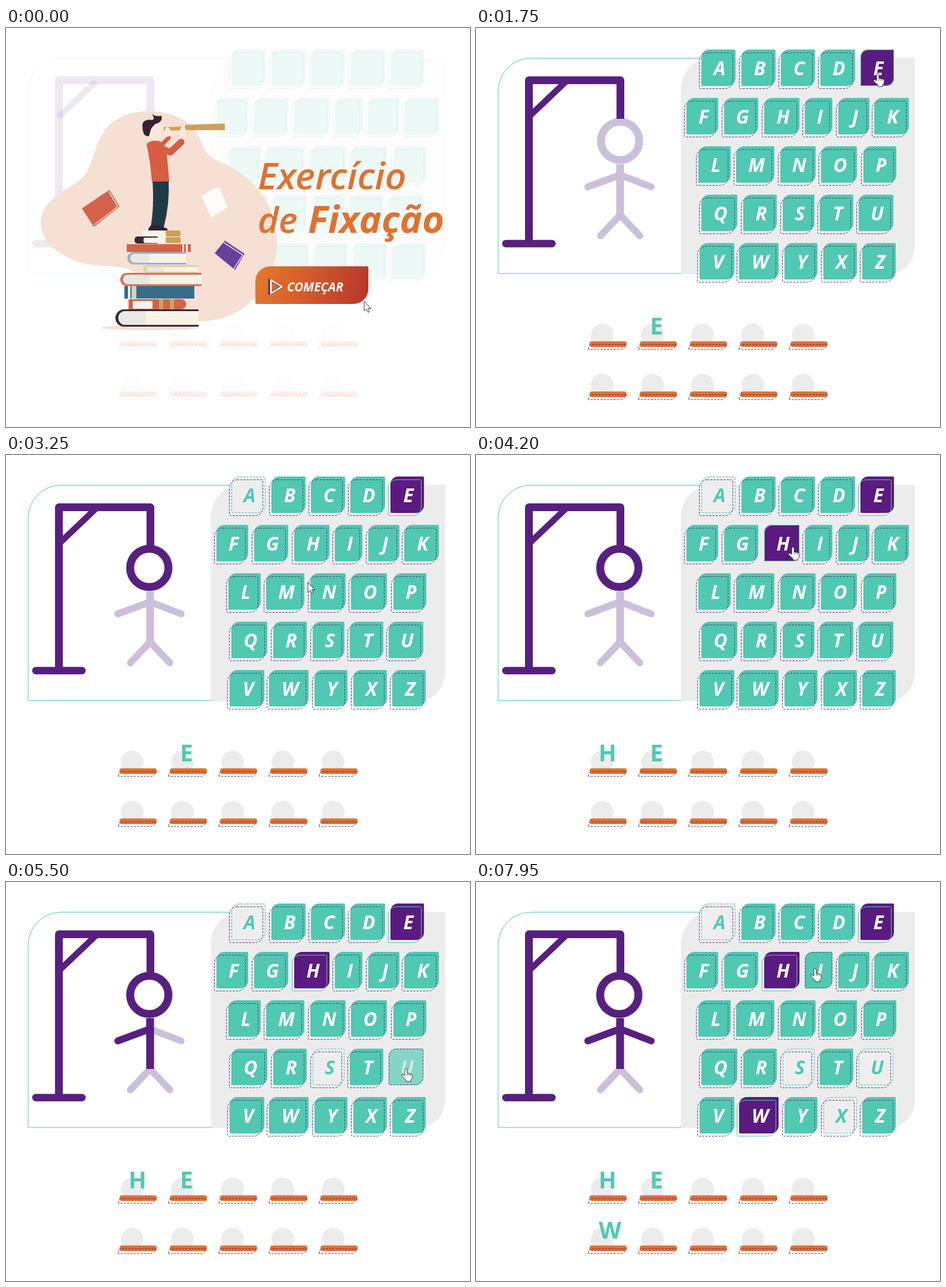
An HTML page with a canvas that plays this animation: 776 by 668 pixels, repeating every 8000 ms.

```html
<!DOCTYPE html>
<html lang="pt">
<head>
<meta charset="utf-8">
<title>Exercício de Fixação</title>
<style>
html, body { margin: 0; width: 100%; height: 100%; overflow: hidden; background: #fff; }
canvas { display: block; }
</style>
</head>
<body>
<canvas id="stage" width="776" height="668"></canvas>
<script>
const ctx = document.getElementById('stage').getContext('2d');
const LOOP = 8000, STEP = 50, FADE = 150;
const TEAL = '#51c8b1', PURPLE = '#57207f', ORANGE = '#e1712f', FAINT = '#cbbfd9', PEACH = '#f5e0d3';
const RED = '#d4624a', GOLD = '#cba258', CREAM = '#f7f3e6';
const FONT = '"Open Sans", "Noto Sans", sans-serif';

// Each row: letters, then left and right edge of every key
const rows = [
  ['ABCDE', [377, 434, 444, 501, 510, 567, 576, 634, 643, 699]],
  ['FGHIJK', [352, 405, 415, 472, 482, 541, 550, 596, 606, 658, 666, 724]],
  ['LMNOP', [372, 426, 435, 499, 509, 568, 577, 637, 648, 703]],
  ['QRSTU', [377, 437, 447, 503, 513, 566, 575, 631, 640, 698]],
  ['VWYXZ', [374, 432, 440, 506, 516, 571, 581, 637, 646, 702]]
];
const keys = rows.flatMap(([letters, edges], r) => [...letters].map((ch, i) =>
  ({ ch, x: edges[2 * i], w: edges[2 * i + 1] - edges[2 * i], y: 36 + 81 * r, h: 61 })));

// Click times; a hit fills a slot [column, row], a miss draws a limb
const hits = { E: [1600, 1, 0], H: [3650, 0, 0], W: [7200, 0, 1] };
const misses = { A: 2550, S: 4600, U: 5450, X: 6200 };

// Pointer moves: start, end, x, y
const moves = [
  [950, 1600, 672, 77], [2050, 2450, 406, 75], [3000, 3250, 505, 214],
  [3250, 3600, 530, 155], [4200, 4550, 541, 315], [5000, 5400, 669, 313],
  [5850, 6200, 613, 388], [6850, 7150, 475, 392], [7550, 7950, 567, 146]
];

const clamp = v => Math.max(0, Math.min(1, v));
const ease = v => v * v * (3 - 2 * v);
const asPath = p => p instanceof Path2D ? p : new Path2D(p);

function fill(path, color) {
  ctx.fillStyle = color;
  ctx.fill(asPath(path));
}
function line(path, color, width, cap = 'round') {
  ctx.strokeStyle = color;
  ctx.lineWidth = width;
  ctx.lineCap = cap;
  ctx.lineJoin = 'round';
  ctx.stroke(asPath(path));
}
function dashed(path, color) {
  ctx.setLineDash([3.5, 2]);
  line(path, color, 1, 'butt');
  ctx.setLineDash([]);
}
function disc(x, y, rx, color, ry = rx) {
  ctx.fillStyle = color;
  ctx.beginPath();
  ctx.ellipse(x, y, rx, ry, 0, 0, 7);
  ctx.fill();
}
function box(x, y, w, h, color, radii = 0) {
  ctx.fillStyle = color;
  ctx.beginPath();
  ctx.roundRect(x, y, w, h, radii);
  ctx.fill();
}
function text(str, x, y, style, color, align = 'left') {
  ctx.font = style + ' ' + FONT;
  ctx.textAlign = align;
  ctx.fillStyle = color;
  ctx.fillText(str, x, y);
}
function withAlpha(a, draw) {
  if (a <= 0) return;
  const old = ctx.globalAlpha;
  ctx.globalAlpha = old * a;
  draw();
  ctx.globalAlpha = old;
}
// Two opposite corners round, the other two almost square
function leaf(x, y, w, h, r = 13) {
  const p = new Path2D();
  p.roundRect(x, y, w, h, [r, 2, r, 2]);
  return p;
}

function pointer(t) {
  let x = 599, y = 458;
  for (const [start, end, tx, ty] of moves) {
    const k = ease(clamp((t - start) / (end - start)));
    x += (tx - x) * k;
    y += (ty - y) * k;
  }
  return { x, y };
}
const over = (k, p) => p.x >= k.x && p.x <= k.x + k.w && p.y >= k.y && p.y <= k.y + k.h;

function drawKey(k, t, hover) {
  const hit = hits[k.ch], miss = misses[k.ch];
  const p = clamp((t - (hit ? hit[0] : miss ?? Infinity)) / FADE);
  const shape = leaf(k.x, k.y, k.w, k.h);
  const rim = leaf(k.x + .5, k.y + .5, k.w - 1, k.h - 1);
  const edge = hover ? rim : leaf(k.x - 3.5, k.y + 5.5, k.w - 1, k.h - 1);
  const letter = color => text(k.ch, k.x + k.w / 2 + 2, k.y + 43, 'italic 700 31.5px', color, 'center');
  fill(shape, TEAL);
  withAlpha(p, () => fill(shape, hit ? '#5b1a80' : '#eeeeef'));
  letter('#fff');
  if (miss) withAlpha(p, () => {
    letter(TEAL);
    dashed(rim, TEAL);
  });
  if (hit && p > 0) line(edge, TEAL, 1);
  else dashed(edge, '#5a3a7d');
}

function drawMan(t) {
  const limbs = [
    (c, x) => line(`M${x - 32} 189a32 32 0 1 1 64 0a32 32 0 1 1-64 0Z`, c, 13),
    c => line('M241 228V313', c, 13, 'butt'),
    c => line('M241 246L187 266', c, 11.5),
    c => line('M241 246L293 266', c, 11.5)
  ];
  line('M208 348L241 313L274 348', FAINT, 11.5);
  limbs.forEach(draw => draw(FAINT, 241));
  Object.values(misses).forEach((at, i) => t >= at && limbs[i](PURPLE, 239.5));
}

function drawGame(t, mouse) {
  box(343, 50, 391, 362, '#ececed', [52, 0, 46, 0]);
  line('M385 50.5H92A55 55 0 0 0 37 105.5V411H343', TEAL, 1);
  drawMan(t);
  line('M88.5 361V87.5H241.5V152', PURPLE, 13, 'butt');
  line('M50 361H127', PURPLE, 12.5);
  line('M88 149L150 90', PURPLE, 10.5, 'butt');
  keys.forEach(k => drawKey(k, t, t > FADE && over(k, mouse)));

  for (let r = 0; r < 2; r++) for (let c = 0; c < 5; c++) {
    const x = 190 + 84 * c, y = 525 + 84 * r;
    disc(x + 21, y - 11, 19, '#ececec');
    box(x, y - .5, 62, 9.5, ORANGE, 4);
    dashed(`M${x - 2} ${y + 13}q0-8 5-8H${x + 60}q-1 8-8 8Z`, '#4a2a78');
  }
  for (const [ch, [at, c, r]] of Object.entries(hits))
    withAlpha(clamp((t - at) / FADE), () =>
      text(ch, (c ? 302 : ch === 'W' ? 224 : 220), 513 + 84 * r, '700 39px', TEAL, 'center'));
}

// Pages between covers, spine rounded on the left
function openBook(x, y, w, h, cover) {
  const r = h / 2, inner = [r - 3, 0, 0, r - 3];
  box(x, y, w, h, cover, [r, 0, 0, r]);
  box(x + 5, y + 3, w - 5, h - 6, CREAM, inner);
  box(x + 5, y + 3, w * .33, h - 6, '#e5e9e2', inner);
}

function drawBooks() {
  disc(240, 502, 80, PEACH, 4);
  box(228, 339, 64, 10, CREAM, 3);
  box(267, 339, 25, 10, GOLD, 3);
  box(215, 349, 77, 12, '#3a2736', 5);
  box(230, 351, 37, 9, CREAM, 3);
  box(253, 349, 39, 12, CREAM, 2);
  box(267, 350, 25, 10, GOLD, 2);
  box(202, 362, 107, 13, RED);
  box(295, 362, 3, 13, CREAM);
  box(301, 362, 3, 13, CREAM);
  openBook(203, 375, 98, 21, '#a3accb');
  openBook(230, 397, 91, 14, '#e2cfa1');
  openBook(191, 410, 136, 22, '#d9705a');
  box(198, 432, 117, 21, '#376d8b');
  box(204, 432, 4, 21, CREAM);
  box(210, 432, 8, 21, '#c8d5bd');
  box(205, 454, 96, 17, RED, [0, 8, 8, 0]);
  box(212, 457, 33, 13, CREAM);
  box(256, 454, 7, 17, GOLD);
  box(274, 454, 7, 17, GOLD);
  openBook(183, 471, 139, 29, '#3b2a3a');
}

function drawPerson() {
  const skin = '#f8e8dc', hair = '#35212f', sweater = '#d75d45';
  fill('M245 254L272 254Q274 295 264 333L242 333Q248 300 245 254Z', '#203b48');
  fill('M243 330L255 330L270 336V339H238Q238 334 243 330Z', hair);
  fill('M235 194Q244 186 258 190L268 200L273 257H244Q241 220 235 194Z', sweater);
  line('M262 203L275 208L293 191', sweater, 11);
  line('M244 198L262 194L272 184', sweater, 7);
  disc(249, 173, 12, skin, 15);
  fill('M230 176Q226 162 230 157Q236 152 244 154Q250 153 244 144Q250 149 260 147Q263 157 249 161L243 168L239 181Q233 182 230 176Z', hair);
  fill('M264 166L300 165V162L366 160V171L300 171L264 172Z', GOLD);
  disc(270, 174, 5, skin, 8);
  disc(296, 174, 5, skin, 10);
}

function drawCover() {
  fill('M58 325C60 285 105 272 128 250C152 225 145 175 188 151C228 130 286 139 311 165C335 190 320 208 360 225C410 246 455 295 453 360C452 430 400 491 325 491C265 490 248 425 202 403C175 395 145 402 112 388C78 374 58 352 58 325Z', PEACH);
  drawBooks();
  drawPerson();
  fill('M127 302L173 271L190 299L147 333Z', RED);
  line('M148 329L187 299L172 274', '#f6e7dc', 1.5);
  fill('M327 281L356 265L371 300L343 318Z', '#fffdf9');
  fill('M349 377L366 356L399 378L383 405Z', '#66419a');
  line('M364 359L396 380L381 403', '#e5d7ec', 1.5);

  text('Exercício', 421, 270, 'italic 600 62.5px', ORANGE);
  text('de', 421, 343, 'italic 600 60px', ORANGE);
  text('Fixação', 505, 343, 'italic 700 63px', ORANGE);

  const grad = ctx.createLinearGradient(417, 399, 606, 450);
  grad.addColorStop(0, '#e27a2d');
  grad.addColorStop(.35, '#d9632b');
  grad.addColorStop(1, '#b7352b');
  fill(leaf(417, 399, 189, 63, 25), grad);
  line('M440 421V445L459 433Z', '#3f2278', 2.5);
  line('M443 422V444L461 433Z', '#fff', 2.5);
  text('COMEÇAR', 470, 441, 'italic 700 20.5px', '#fff');
}

function drawPointer(p, hand) {
  ctx.save();
  ctx.translate(p.x, p.y);
  const shape = hand
    ? 'M-2 11V1a2 2 0 0 1 4 0V7l7 1.5q2 .5 2 3l-1 5-2 2v2.5H0v-2.5L-7 12q-1-3 2-2.5z'
    : 'M0 0V16L4 12.5L6.5 18L9 17L6.5 11.5H11Z';
  fill(shape, '#fff');
  line(shape, '#333', 1);
  if (hand) line('M2 7v4M5 8v3M8 9v3', '#333', .8);
  ctx.restore();
}

function render(t) {
  ctx.clearRect(0, 0, 776, 668);
  const mouse = pointer(t), swap = clamp(t / FADE);
  withAlpha(.1 + .9 * swap, () => drawGame(t, mouse));
  withAlpha(1 - swap, drawCover);
  drawPointer(mouse, keys.some(k => over(k, mouse)));
}

const begin = performance.now();
function tick() {
  const t = (performance.now() - begin) % LOOP;
  render(Math.floor(t / STEP) * STEP);
  requestAnimationFrame(tick);
}
tick();
</script>
</body>
</html>
```
